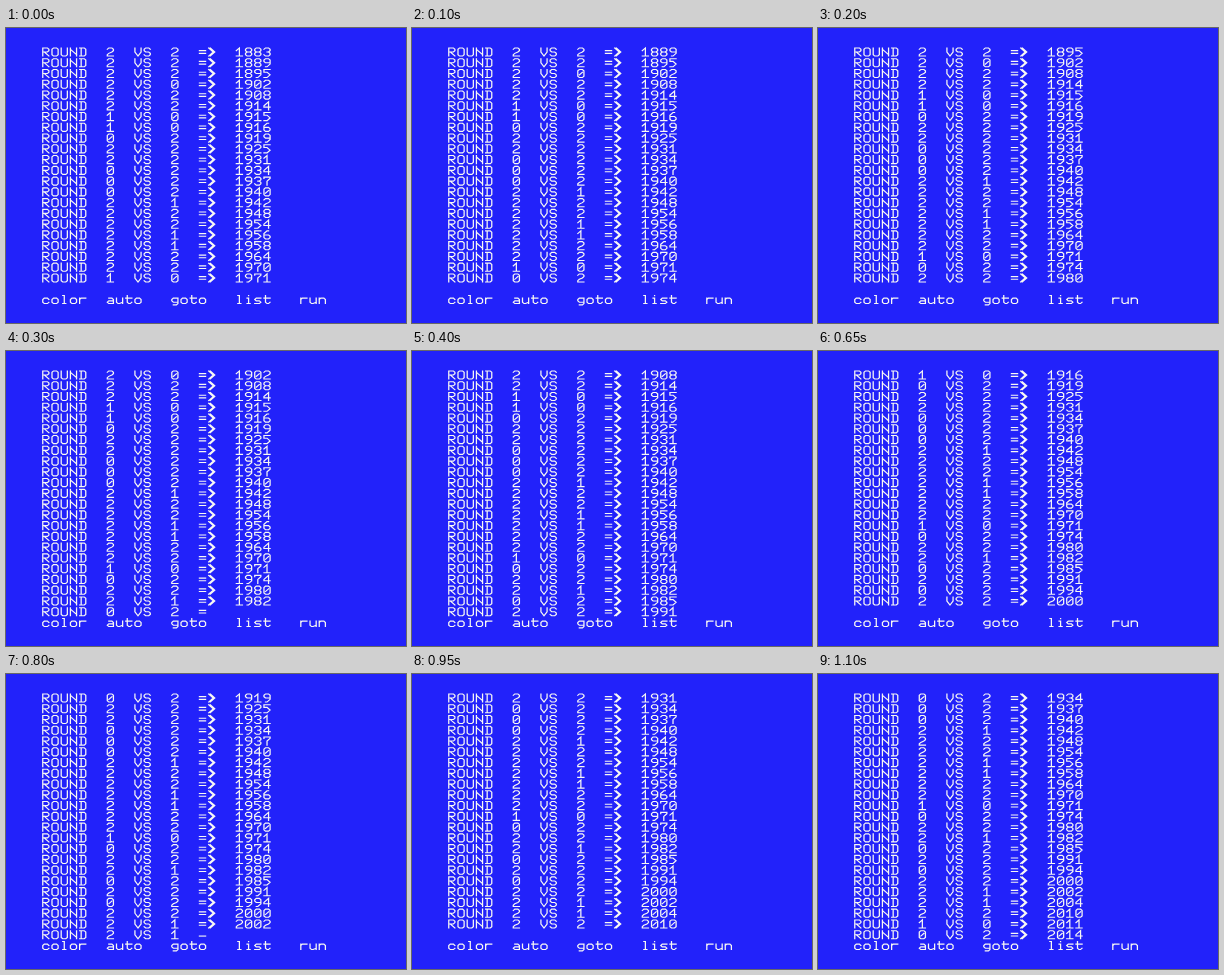
Recreate the animation shown at these times as an HTML page with a canvas. Size 400 by 295 pixels, loop 1150 ms.

```html
<!DOCTYPE html>
<html lang="en">
<head>
<meta charset="utf-8">
<title>Round scores</title>
<style>
html, body { margin: 0; width: 100%; height: 100%; overflow: hidden; background: #2222fa; }
canvas { display: block; }
</style>
</head>
<body>
<canvas id="screen" width="400" height="295" role="img" aria-label="BASIC screen listing round scores"></canvas>
<script>
const ctx = document.getElementById('screen').getContext('2d');
const LOOP = 1150, STEP = 50, ROWS = 23;
const LEFT = 36, TOP = 19.3, DOT_W = 1.536, DOT_H = 1.345;

// Stroke font on a grid of 5 by 8 dots
const ring = 'M1 0H3L4 1V5L3 6H1L0 5V1Z';
const font = {
  0: ring + 'M1 4L3 2',
  1: 'M0 2L2 0V6M0 6H4',
  2: 'M0 1L1 0H3L4 1V2L3 3L1 4L0 5V6H4',
  3: 'M0 1L1 0H3L4 1V2L3 3H2M3 3L4 4V5L3 6H1L0 5',
  4: 'M3 6V0L0 3V4H4',
  5: 'M4 0H0V2H2L4 4L2 6H0',
  6: 'M3 0H2L0 2V5L1 6H3L4 5V4L3 3H0',
  7: 'M0 1V0H4V1L2 3V6',
  8: 'M1 0H3L4 1V2L3 3H1L0 2V1ZM1 3L0 4V5L1 6H3L4 5V4L3 3',
  9: 'M4 3H1L0 2V1L1 0H3L4 1V4L2 6H1',
  R: 'M0 6V0H3L4 1V2L3 3H0M1 3L4 6',
  O: ring,
  U: 'M0 0V5L1 6H3L4 5V0',
  N: 'M0 6V0M0 1L4 5M4 6V0',
  D: 'M0 0H3L4 1V5L3 6H0M1 0V6',
  V: 'M0 0V3L2 6L4 3V0',
  S: 'M4 1L3 0H1L0 1V2L1 3H3L4 4V5L3 6H1L0 5',
  '=': 'M0 2H4M0 4H4',
  '-': 'M0 4H4',
  '>': 'M0 0L3 3L0 6M1 0L4 3L1 6',
  a: 'M1 2H3L4 3V6H1L0 5L1 4H4',
  c: 'M4 3L3 2H1L0 3V5L1 6H3L4 5',
  g: 'M4 2H1L0 3V4L1 5H4M4 2V6L3 7H1',
  i: 'M2 0V.1M1 2H2V6M1 6H3',
  l: 'M1 0H2V6M1 6H3',
  n: 'M0 2V6M0 3L1 2H3L4 3V6',
  o: 'M1 2H3L4 3V5L3 6H1L0 5V3Z',
  r: 'M0 2V6M0 3L1 2H4',
  s: 'M4 2H1L0 3L1 4H3L4 5L3 6H0',
  t: 'M1 0V5L2 6H3L4 5M0 2H4',
  u: 'M0 2V5L1 6H2L4 5M4 2V6'
};
const glyphs = {};
for (const ch in font) glyphs[ch] = new Path2D(font[ch]);

// Rock-paper-scissors: hand value plus 0, 3 or 6 for the outcome
const hands = ('22 22 22 20 22 22 10 10 02 22 22 02 02 02 21 22 22 21 21 22 22 10 ' +
  '02 22 21 02 22 02 22 21 21 22 10 02').split(' ');
let total = 1877;
const lines = hands.map(([a, b]) => {
  total += +b + 1 + 3 * ((b - a + 4) % 3);
  return `ROUND  ${a}  VS  ${b}  =>  ${total}`;
});

// Time in ms and lines scrolled so far
const pace = [[0, .3], [200, 2.41], [300, 3.592], [500, 5.72], [800, 8.587], [950, 10.15], [1100, 11.75]];

function progress(t) {
  const i = pace.findIndex(p => p[0] >= t);
  if (i < 1) return pace[0][1];
  const [t0, p0] = pace[i - 1], [t1, p1] = pace[i];
  return p0 + (p1 - p0) * (t - t0) / (t1 - t0);
}

// Each line waits, then is printed quickly
function typed(line, phase) {
  const count = Math.max(0, (phase - .45) / .2 * 26), n = Math.floor(count);
  const half = line[n] === '=' && count % 1 > .5 ? '-' : '';
  return line.slice(0, n) + half;
}

function print(text, row) {
  [...text].forEach((ch, col) => {
    if (ch === ' ') return;
    ctx.setTransform(DOT_W, 0, 0, DOT_H,
      LEFT + (col * 6 + .5) * DOT_W, TOP + (row * 8 + .5) * DOT_H);
    ctx.stroke(glyphs[ch]);
  });
}

function draw(t) {
  const p = progress(t), first = Math.floor(p), last = first + ROWS - 1;
  ctx.setTransform(1, 0, 0, 1, 0, 0);
  ctx.fillStyle = '#2222fa';
  ctx.fillRect(0, 0, 400, 295);
  ctx.strokeStyle = '#f8f8f4';
  ctx.lineWidth = .82;
  ctx.lineCap = 'square';
  lines.slice(first, last).forEach(print);
  print(typed(lines[last], p - first), ROWS - 1);
  print('color  auto   goto   list   run', ROWS);
}

const start = performance.now();
function tick() {
  const t = (performance.now() - start) % LOOP;
  draw(Math.floor(t / STEP) * STEP);
  requestAnimationFrame(tick);
}
tick();
</script>
</body>
</html>
```
